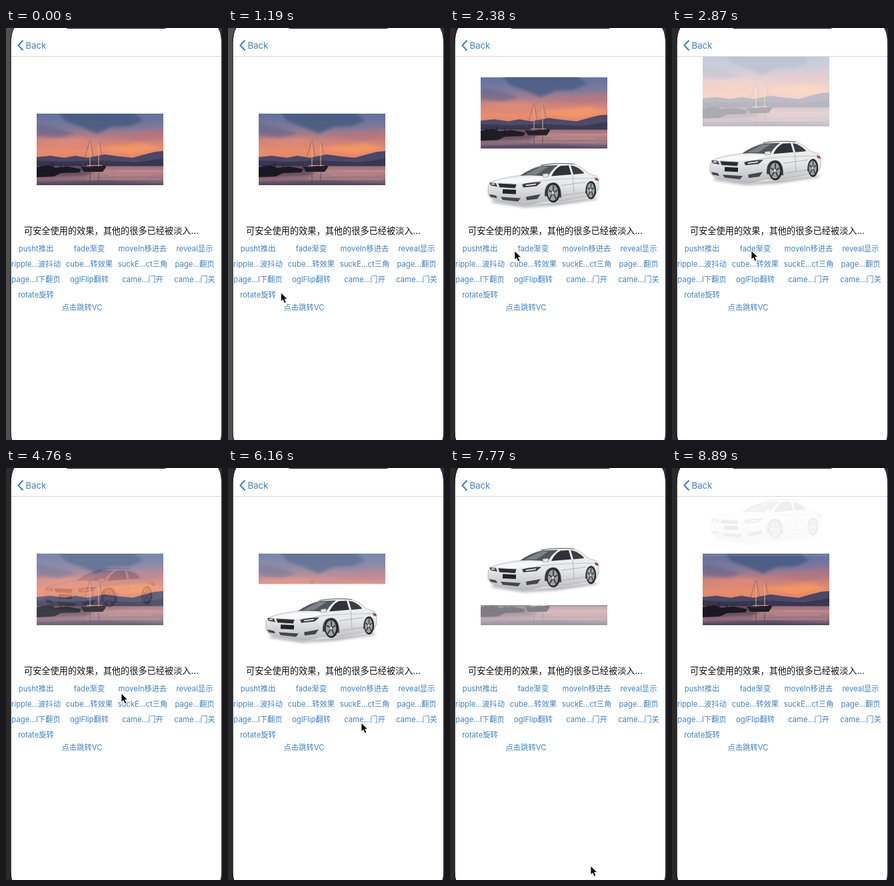
An HTML page for the animation above (8.96 s loop, 324x616 px).

```html
<!DOCTYPE html>
<html lang="zh-CN">
<head>
<meta charset="utf-8">
<title>Transitions</title>
<style>
html, body { margin: 0; width: 100%; height: 100%; overflow: hidden; background: #fff; }
svg { display: block; width: 324px; height: 616px; }
text { font-family: Inter, "Noto Sans CJK SC", "Noto Sans CJK", sans-serif; }
#buttons { font-size: 11.3px; fill: #4482bf; text-anchor: middle; }
</style>
</head>
<body>
<svg viewBox="0 0 324 616">
  <defs>
    <linearGradient id="sky" x2="0" y2="1">
      <stop offset="0" stop-color="#5f72a2"/>
      <stop offset=".3" stop-color="#7f7899"/>
      <stop offset=".55" stop-color="#c5807f"/>
      <stop offset=".8" stop-color="#e98b6c"/>
      <stop offset="1" stop-color="#d98670"/>
    </linearGradient>
    <linearGradient id="water" x2="0" y2="1">
      <stop offset="0" stop-color="#8d6876"/>
      <stop offset=".35" stop-color="#b98487"/>
      <stop offset=".7" stop-color="#96727f"/>
      <stop offset="1" stop-color="#5e5169"/>
    </linearGradient>
    <linearGradient id="body" x2="0" y2="1">
      <stop offset="0" stop-color="#f2f2f3"/>
      <stop offset=".5" stop-color="#e8e9eb"/>
      <stop offset="1" stop-color="#b9bbbf"/>
    </linearGradient>
    <filter id="soft" x="-20%" y="-50%" width="140%" height="200%"><feGaussianBlur stdDeviation="2"/></filter>
    <clipPath id="frame"><rect x="46" y="128" width="190" height="107"/></clipPath>
    <g id="wheel">
      <ellipse rx="10" ry="14.5" fill="#29292b"/>
      <ellipse cx="-.6" rx="7.8" ry="11.8" fill="#9fa1a5"/>
      <path d="M0 0V-11M0 0L6-4M0 0L4 9M0 0L-6 9M0 0L-7-4" stroke="#47484c" stroke-width="2.2"/>
      <ellipse cx="-.6" rx="1.8" ry="2.4" fill="#d5d6d8"/>
    </g>
  </defs>

  <rect width="324" height="616" fill="#fff"/>

  <g id="stage">
    <g id="boat">
      <g clip-path="url(#frame)">
        <rect x="46" y="128" width="190" height="70" fill="url(#sky)"/>
        <g filter="url(#soft)">
          <path d="M78 126H190L206 138L186 147L158 148L136 158L116 149L90 140Z" fill="#46587f" opacity=".8"/>
          <path d="M46 143L76 149L104 158L80 164L46 161Z" fill="#66658c" opacity=".65"/>
          <path d="M150 162L236 149V165L196 168Z" fill="#b8717f" opacity=".6"/>
          <path d="M46 169L110 164L140 172L90 178Z" fill="#e48c78" opacity=".6"/>
          <path d="M130 180L205 172L236 179L190 188Z" fill="#fa9a62" opacity=".7"/>
        </g>
        <rect x="46" y="204" width="190" height="31" fill="url(#water)"/>
        <path d="M46 193L66 191L88 194L104 191L122 194L148 189L170 192L190 194L208 189L224 185L236 184V206H46Z" fill="#4b4764"/>
        <path d="M46 198L90 200L140 198L196 201L236 195V206.5H46Z" fill="#393750"/>
        <path d="M46 205H150L120 221L46 224Z" fill="#2f2b3e" opacity=".55" filter="url(#soft)"/>
        <path d="M46 231L150 228L236 234V238H46Z" fill="#463e58" opacity=".6" filter="url(#soft)"/>
        <path d="M166 214H236M154 220H220M120 226H232" stroke="#d19a90" stroke-width="1.5" opacity=".45"/>
        <path d="M46 208L64 205L74 209L92 207L113 211L110 216L82 217L72 222L46 223Z" fill="#1b1824"/>
        <path d="M70 202V221M82 205V217M54 205V222" stroke="#1b1824" stroke-width="1.3"/>
        <path d="M112 207L124 208L148 205L150 208L145 215H117Z" fill="#211c26"/>
        <path d="M121 205.5H145" stroke="#c9a093" stroke-width="1"/>
        <path d="M126 166V207M139 167V207" stroke="#dcb290" stroke-width="1"/>
        <path d="M126 167L114 207M139 168L148 205M126 167L134 207" stroke="#5f4b5b" stroke-width=".5"/>
        <path d="M126 216V231M139 216V229" stroke="#3a344c" stroke-width="1.2" opacity=".5"/>
      </g>
    </g>
    <g id="car">
      <rect x="46" y="128" width="190" height="107" fill="#fff"/>
      <g transform="translate(0 29)">
        <path d="M62 176L116 183L154 180L218 172L222 174L160 183L112 186L64 179Z" fill="#3f4045" opacity=".6" filter="url(#soft)"/>
        <path d="M57 158Q57 151 64 148Q80 142 106 139Q120 129 138 123.5Q162 119.5 186 122Q198 126 208 136L220 140Q224 146 223 159L218 169L168 177L140 178L118 183L72 177Q59 174 57 167Z" fill="url(#body)" stroke="#9c9ea2" stroke-width=".6"/>
        <path d="M105 139.5Q120 129 138 124.5L162 123.5Q152 131 147 140.5Q124 138 105 139.5Z" fill="#53565c"/>
        <path d="M112 138L136 126L148 125.5L130 137.5Z" fill="#7d8188"/>
        <path d="M152 140Q157 129 166 124.5L178 124L182 137.5Z" fill="#303237"/>
        <path d="M181 124Q191 125 200 134L201 136L185 137.5Z" fill="#3c3e44"/>
        <path d="M137 123.5Q162 119.5 186 122" fill="none" stroke="#55575c" stroke-width=".9"/>
        <path d="M64 149Q90 141 145 142L128 149Q108 149 91 152Z" fill="#f8f8f9"/>
        <path d="M128 149Q145 144 218 143" fill="none" stroke="#b8babd" stroke-width=".8"/>
        <path d="M167 154L204 149M168 169L203 164M184 138L186 166" fill="none" stroke="#a4a6aa" stroke-width=".8"/>
        <path d="M139 137L147 136L148 140.5L140 142Z" fill="#e9eaec" stroke="#85878b" stroke-width=".6"/>
        <path d="M72 150.5L100 152L98 158.5L74 157Z" fill="#2b2c30" stroke="#c4c6ca" stroke-width="1"/>
        <path d="M59 149.5L69 150.5L71 156L61 154Z" fill="#44474e"/>
        <path d="M108 152.5Q122 148.5 137 149L130 155L110 157Z" fill="#3d4046"/>
        <path d="M62 152H67M114 154L129 152" stroke="#e3e5e8" stroke-width="1.8"/>
        <path d="M59 167L69 169L71 173L61 171ZM76 171L106 173L102 178L79 175.5ZM114 171L136 167L131 174L115 176Z" fill="#45464b"/>
        <rect x="79" y="160" width="20" height="6.5" fill="#222327" transform="rotate(3 89 163)"/>
        <path d="M142 170Q141 150 155 149.5Q167 150 167 172Z" fill="#424347"/>
        <use href="#wheel" transform="translate(155 165)"/>
        <path d="M203 166Q203 148 212 147.5Q220 149 219 166Z" fill="#424347"/>
        <use href="#wheel" transform="translate(211.5 161) scale(.75 .93)"/>
        <path d="M217 142L222 143.5L223 147.5L218 146Z" fill="#94494b"/>
      </g>
    </g>
  </g>

  <rect x="8" width="315" height="42" fill="#fff"/>
  <path d="M8 42.5H323" stroke="#d8d8da"/>
  <path d="M25.5 18.5L18.5 26L25.5 33.5" fill="none" stroke="#4482bf" stroke-width="2.1"/>
  <text x="29.5" y="31" font-size="13.2" fill="#4482bf">Back</text>
  <text x="27" y="308" font-size="13.2" fill="#111">可安全使用的效果，其他的很多已经被淡入…</text>
  <g id="buttons"></g>

  <path id="bezel" d="M0 0H12Q7.5 8 7.5 24V604Q7.5 611 9 616H0Z"/>
  <path d="M12 0Q7 8 7 24V604Q7 611 8.5 616" fill="none" stroke="#1c1c1d"/>
  <path d="M324 0H318Q323 8 323 24V604Q323 611 321.5 616H324Z" fill="#2f2f30"/>
  <path d="M90 0H241L238 1H93Z" fill="#1a1a1b"/>
  <path id="cursor" d="M0 0V13.2L3 10.4L5.3 15.6L7.8 14.5L5.5 9.5H9.7Z" fill="#000" stroke="#fff" stroke-width=".8"/>
</svg>
<script>
const LOOP = 8960, STEP = 70, HEIGHT = 107;
const $ = id => document.getElementById(id);
const stage = $("stage"), boat = $("boat"), car = $("car"), cursor = $("cursor"), bezel = $("bezel");

const columns = [45, 125, 205, 283];
const labels = [
  "pusht推出", "fade渐变", "moveIn移进去", "reveal显示",
  "ripple…波抖动", "cube…转效果", "suckE…ct三角", "page…翻页",
  "page…l下翻页", "oglFlip翻转", "came…门开", "came…门关",
  "rotate旋转"
];
function addButton(label, x, y) {
  const node = document.createElementNS("http://www.w3.org/2000/svg", "text");
  node.setAttribute("x", x);
  node.setAttribute("y", y);
  node.textContent = label;
  $("buttons").append(node);
}
labels.forEach((label, i) => addButton(label, columns[i % 4], 334 + 23 * Math.floor(i / 4)));
addButton("点击跳转VC", 114, 422);

// Pointer stops: time, x, y
const stops = [
  [700, 150, 620], [1400, 60, 334], [2000, 60, 334], [2650, 119, 333], [3500, 119, 333],
  [4400, 173, 337], [5350, 173, 337], [5950, 200, 381], [6400, 200, 381], [7000, 284, 335],
  [7330, 284, 335], [7700, 211, 595], [7850, 211, 595], [8100, 213, 620]
];

const clamp = v => Math.max(0, Math.min(1, v));
const progress = (t, start, duration) => clamp((t - start) / duration);
const fadeIn = p => clamp(2 * p);
const fadeOut = p => clamp(2 * (1 - p));

function place(node, dy, opacity) {
  node.setAttribute("transform", `translate(0 ${dy.toFixed(2)})`);
  node.setAttribute("opacity", opacity.toFixed(3));
}

function setLayers(boatY, boatAlpha, carY, carAlpha, top) {
  if (stage.lastElementChild !== top) stage.append(top);
  place(boat, boatY, boatAlpha);
  place(car, carY, carAlpha);
}

function drawTransition(t) {
  if (t < 3300) { // push
    const p = progress(t, 1574, 1580);
    setLayers(-HEIGHT * p, fadeOut(p), HEIGHT * (1 - p), fadeIn(p), car);
  } else if (t < 5150) { // fade
    const p = progress(t, 3350, 1660);
    setLayers(0, p, 0, p < 1 ? 1 : 0, boat);
  } else if (t < 7200) { // move in
    const p = progress(t, 5210, 1652);
    setLayers(0, fadeOut(p), HEIGHT * (1 - p), fadeIn(p), car);
  } else { // reveal
    const p = progress(t, 7309, 1647);
    setLayers(0, fadeIn(p), -HEIGHT * p, fadeOut(p), car);
  }
}

function drawCursor(t) {
  const next = stops.findIndex(stop => stop[0] > t);
  cursor.setAttribute("visibility", next > 0 ? "visible" : "hidden");
  if (next <= 0) return;
  const [t0, x0, y0] = stops[next - 1], [t1, x1, y1] = stops[next];
  const k = progress(t, t0, t1 - t0), e = k * k * (3 - 2 * k);
  cursor.setAttribute("transform", `translate(${x0 + (x1 - x0) * e} ${y0 + (y1 - y0) * e})`);
}

function render(now) {
  const t = Math.floor((now % LOOP) / STEP) * STEP;
  drawTransition(t);
  drawCursor(t);
  bezel.setAttribute("fill", t < 1400 ? "#505050" : "#2a2a2b");
}

const startTime = performance.now();
function tick() {
  render(performance.now() - startTime);
  requestAnimationFrame(tick);
}
tick();
</script>
</body>
</html>
```
